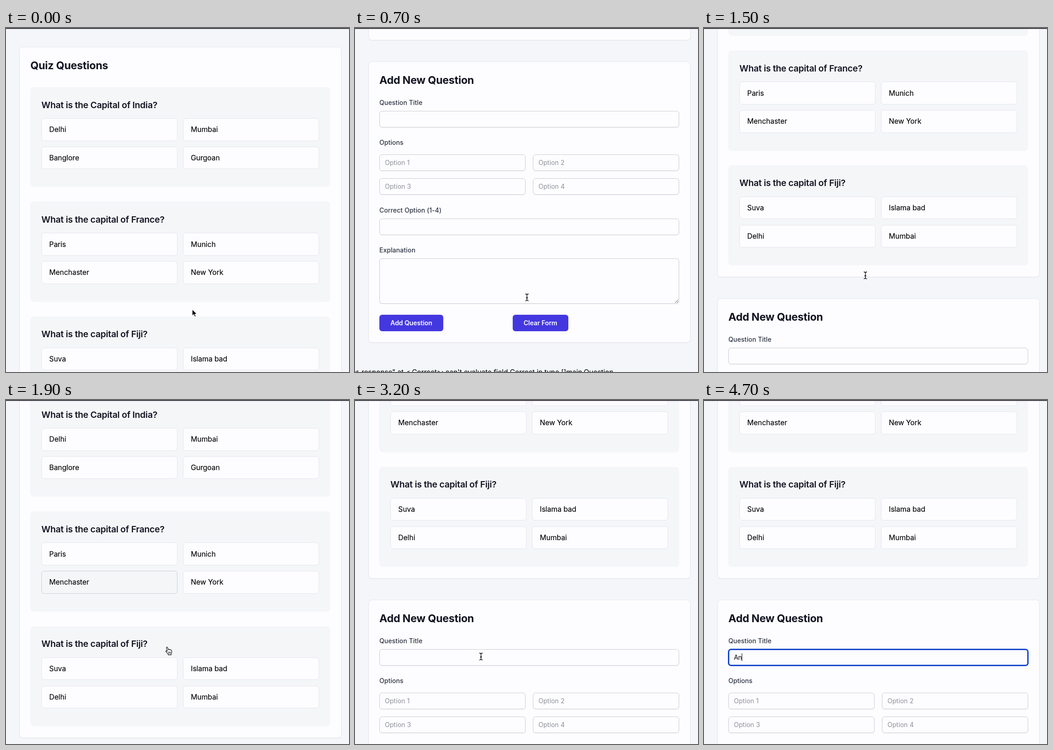
Write an HTML page that moves like this. It is 746x751 px and loops after 5 s.

```html
<!DOCTYPE html>
<html lang="en">
<head>
<meta charset="utf-8">
<title>Quiz builder</title>
<style>
  html, body { margin: 0; width: 100%; height: 100%; overflow: hidden; }
  body { position: relative; background: #f4f6f9; font-family: Inter, "Open Sans", sans-serif; }
  body * { box-sizing: border-box; position: absolute; white-space: pre; }

  #page, #pointer, #pointer svg, .hovered, .focus, .typed, .caret {
    animation-duration: 5s;
    animation-timing-function: step-end;
    animation-iteration-count: infinite;
  }
  #page { left: 0; top: 0; width: 746px; height: 1700px; animation-name: scroll; }
  #bar { left: 0; top: 0; width: 100%; height: 2px; background: #403c44; }

  .card { background: #fdfcfe; border: 1px solid #e5e7eb; border-radius: 8px; box-shadow: 0 1px 2px #0000000a; }
  .question { background: #f4f6f8; border-radius: 8px; }
  .option, .input, .button { display: flex; align-items: center; border-radius: 6px; }
  .option { padding-left: 16px; background: #fdfcfe; border: 1px solid #e5e7eb; font-size: 15.5px; color: #000; -webkit-text-stroke: .15px; }
  .input { padding-left: 11px; background: #fdfcfe; border: 1px solid #cdced4; box-shadow: 0 1px 2px #0000000d; font-size: 13.9px; letter-spacing: .1px; color: #8b9099; }
  .button { justify-content: center; background: #4338e0; color: #fff; font-size: 13.9px; font-weight: 600; letter-spacing: -.04px; }

  .text { line-height: 30px; color: #111320; }
  .title { font-size: 23.1px; font-weight: 700; letter-spacing: -.25px; }
  .heading { font-size: 19.3px; font-weight: 600; letter-spacing: -.26px; }
  .label { font-size: 13.9px; font-weight: 500; letter-spacing: .1px; color: #2b3341; }
  .error { font-size: 15.5px; letter-spacing: -.14px; color: #000; }

  .hovered { animation-name: hover; }
  .focus { border: 3px solid #1447cc; border-radius: 7px; animation-name: focus; }
  .typed { font-size: 13.9px; color: #000; }
  .first { animation-name: first; }
  .second { animation-name: second; }
  .caret { background: #000; animation-name: caret; }

  #pointer { left: 0; top: 0; animation-name: move; }
  #pointer svg { overflow: visible; width: 1px; height: 1px; left: 0; top: 0; }
  #arrow { animation-name: arrow; }
  #beam { animation-name: beam; }
  #hand { animation-name: hand; }

  /* One 100 ms step is 2%. */
  @keyframes scroll {
    0% { transform: translateY(0); }
    4% { transform: translateY(-50px); }
    6% { transform: translateY(-260px); }
    8% { transform: translateY(-540px); }
    10% { transform: translateY(-740px); }
    12% { transform: translateY(-825px); }
    14% { transform: translateY(-847px); }
    16% { transform: translateY(-850px); }
    18% { transform: translateY(-851px); }
    22% { transform: translateY(-847px); }
    24% { transform: translateY(-834px); }
    26% { transform: translateY(-765px); }
    28% { transform: translateY(-580px); }
    30% { transform: translateY(-330px); }
    32% { transform: translateY(-120px); }
    34% { transform: translateY(-12px); }
    36% { transform: translateY(-18px); }
    38% { transform: translateY(-136px); }
    40% { transform: translateY(-270px); }
    42% { transform: translateY(-385px); }
    44% { transform: translateY(-455px); }
    46%, 100% { transform: translateY(-484px); }
  }
  @keyframes move {
    0% { transform: translate(405px, 614px); }
    10% { transform: translate(398px, 608px); }
    12% { transform: translate(384px, 597px); }
    14% { transform: translate(374px, 588px); }
    18% { transform: translate(368px, 576px); }
    20% { transform: translate(360px, 560px); }
    22% { transform: translate(353px, 545px); }
    24% { transform: translate(351px, 540px); }
    48% { transform: translate(348px, 534px); }
    50% { transform: translate(330px, 508px); }
    52% { transform: translate(315px, 500px); }
    54% { transform: translate(306px, 496px); }
    56% { transform: translate(300px, 495px); }
    60% { transform: translate(296px, 512px); }
    62% { transform: translate(284px, 546px); }
    64% { transform: translate(274px, 560px); }
    66% { transform: translate(190px, 560px); }
    68% { transform: translate(95px, 559px); }
    70%, 100% { transform: translate(60px, 558px); }
  }
  @keyframes arrow {
    0% { opacity: 1; }
    12% { opacity: 0; }
    50% { opacity: 1; }
    62%, 100% { opacity: 0; }
  }
  @keyframes beam {
    0% { opacity: 0; }
    12% { opacity: 1; }
    34% { opacity: 0; }
    62% { opacity: 1; }
    72%, 100% { opacity: 0; }
  }
  @keyframes hand {
    0% { opacity: 0; }
    34% { opacity: 1; }
    50%, 100% { opacity: 0; }
  }
  @keyframes hover {
    0% { background: #fdfcfe; border-color: #e5e7eb; }
    34% { background: #f4f6f8; border-color: #cdced4; }
    52%, 100% { background: #fdfcfe; border-color: #e5e7eb; }
  }
  @keyframes focus { 0% { opacity: 0; } 70%, 100% { opacity: 1; } }
  @keyframes first { 0% { opacity: 0; } 86%, 100% { opacity: 1; } }
  @keyframes second { 0% { opacity: 0; } 92%, 100% { opacity: 1; } }
  @keyframes caret {
    0% { opacity: 0; transform: none; }
    70% { opacity: 1; transform: none; }
    80% { opacity: 0; transform: none; }
    86% { opacity: 1; transform: translateX(9px); }
    92%, 100% { opacity: 1; transform: translateX(17px); }
  }
</style>
</head>
<body>
<div id="page"></div>
<div id="bar"></div>
<div id="pointer">
  <svg id="arrow"><path d="M0 0V14.5L3.4 11.4L5.7 16.6L8.1 15.5L5.9 10.5H10.4Z" fill="#000" stroke="#fff" stroke-width="1.1" stroke-linejoin="round"/></svg>
  <svg id="beam"><path d="M-3.5 -7.5Q0 -7.5 0 -5V5Q0 7.5 -3.5 7.5M3.5 -7.5Q0 -7.5 0 -5V5Q0 7.5 3.5 7.5M-2 1H2" fill="none" stroke="#000" stroke-width="1.3"/></svg>
  <svg id="hand" stroke="#000" stroke-width="1.1" stroke-linejoin="round" stroke-linecap="round">
    <g transform="translate(-.8 0)">
      <path d="M-1.4 1Q-1.6 -.7 -.1 -.8Q1 -.8 1.4 .8L2.6 5.3Q2.7 4 4 4.1Q5.2 4.2 5.4 5.4Q5.8 4.6 6.9 4.8Q8 5 8.2 6.1Q10 5.6 10.2 7.6V10.6Q10.1 12.4 8.9 14.2V16.4H2.6V14.8L-1.3 10.6Q-3.2 8.4 -2.2 7.7Q-1.2 7.2 .6 8.8Z" fill="#fff"/>
      <path d="M3.3 9.8V13.3M5.4 9.8V13.3M7.4 9.8V13.3" fill="none" stroke-width=".9"/>
    </g>
  </svg>
</div>
<script>
  const page = document.getElementById("page");

  function box(kind, x, y, w, h, text = "") {
    const el = document.createElement("div");
    el.className = kind;
    el.textContent = text;
    Object.assign(el.style, { left: x + "px", top: y + "px", width: w + "px", height: h + "px" });
    page.append(el);
    return el;
  }

  // Places one line of text by its vertical centre.
  function line(kind, x, middle, text) {
    const el = box("text " + kind, x, middle - 15, 0, 30, text);
    el.style.width = "auto";
    return el;
  }

  const quiz = [
    ["What is the Capital of India?", "Delhi", "Mumbai", "Banglore", "Gurgoan"],
    ["What is the capital of France?", "Paris", "Munich", "Menchaster", "New York"],
    ["What is the capital of Fiji?", "Suva", "Islama bad", "Delhi", "Mumbai"]
  ];

  box("card", 28.5, 41, 701, 832.5);
  line("title", 53, 82, "Quiz Questions");
  quiz.forEach(([heading, ...options], q) => {
    const top = 129 + q * 250.4;
    box("question", 53, top, 652, 218.3);
    line("heading", 77, top + 38.5, heading);
    options.forEach((name, i) => {
      const kind = name === "Menchaster" ? "option hovered" : "option";
      box(kind, 77 + (i % 2) * 308, top + 68 + (i >> 1) * 61.7, 296, 49.5, name);
    });
  });

  const form = 919.5;
  box("card", 28.5, form, 701, 614);
  line("title", 53, form + 41, "Add New Question");
  line("label", 53, form + 90, "Question Title");
  box("input", 53, form + 108, 652, 36);
  line("label", 53, form + 177.5, "Options");
  for (let i = 0; i < 4; i++) {
    box("input", 53 + (i % 2) * 334, form + 203.5 + (i >> 1) * 51.6, 318, 36, "Option " + (i + 1));
  }
  line("label", 53, form + 325, "Correct Option (1-4)");
  box("input", 53, form + 343, 652, 36);
  line("label", 53, form + 412, "Explanation");
  box("input", 53, form + 430.5, 652, 99).innerHTML =
    '<svg style="right:0;bottom:0" width="9" height="9"><path d="M1 8L8 1M5 8L8 5" stroke="#555" fill="none"/></svg>';
  box("button", 53, form + 553.5, 139, 36, "Add Question");
  box("button", 342.5, form + 553.5, 121.5, 36, "Clear Form");

  box("focus", 52, form + 107, 654, 38);
  line("typed first", 65, form + 126, "A");
  line("typed second", 74.2, form + 126, "n");
  box("caret", 65, form + 117.5, 1, 17);

  const error = line("error", 0, 1599, "user-response\" at <.Correct>: can't evaluate field Correct in type []main.Question");
  error.style.left = "auto";
  error.style.right = 746 - 562 + "px";
</script>
</body>
</html>
```
